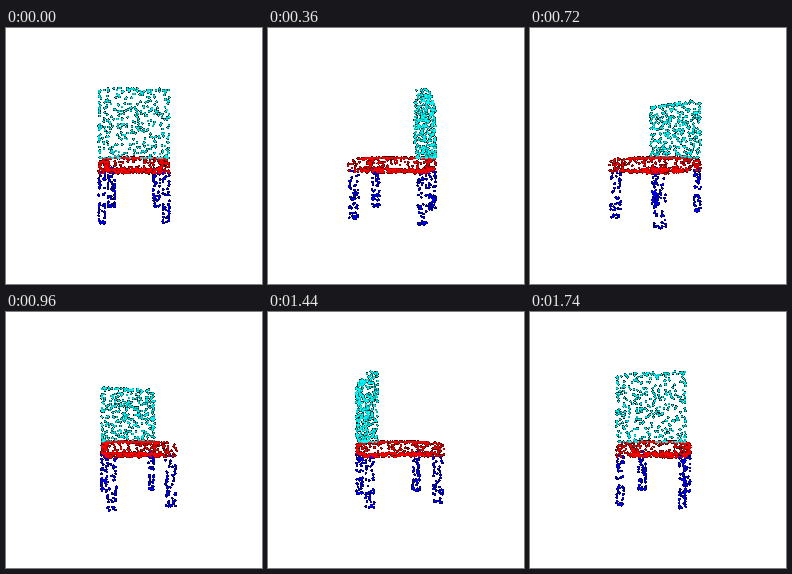
Animation of 256x256 px, one loop 1.8 s. Source, as a matplotlib script:

```python
import numpy as np
import matplotlib.pyplot as plt
from matplotlib.animation import FuncAnimation

SIZE, FRAMES, LOOP_MS = 256, 30, 1800
FOCAL = SIZE / 2 / np.tan(np.radians(30))
DIST = 2.7
RADIUS = 1.4  # dot radius in pixels
CYAN, RED, BLUE = (0, 1, 1), (1, 0, 0), (0, 0, 1)

rng = np.random.default_rng(7)


def box(n, lo, hi):
    """Random points spread evenly over the surface of a box."""
    lo, hi = np.array(lo, float), np.array(hi, float)
    size = hi - lo
    areas = size.prod() / size
    axis = rng.choice(3, n, p=areas / areas.sum())
    unit = rng.random((n, 3))
    unit[np.arange(n), axis] = rng.integers(0, 2, n)
    return lo + unit * size


def make_seat(n):
    """Slab with softly rounded top edges."""
    pts = box(n, (-0.365, -0.178, -0.45), (0.365, -0.022, 0.43))
    x, y, z = pts.T
    rim = np.maximum(abs(x) / 0.365, abs(z) / 0.45) ** 8
    pts[:, 1] = -0.178 + (y + 0.178) * (1 - 0.2 * rim)
    return pts


def make_leg(n, side, x, z, bottom):
    pts = box(n, (x[0], bottom, z[0]), (x[1], -0.17, z[1]))
    pts[:, 0] *= side
    return pts


parts = [
    (box(390, (-0.362, -0.02, 0.31), (0.362, 0.695, 0.435)), CYAN),
    (make_seat(460), RED),
]
for side in (-1, 1):
    parts.append((make_leg(54, side, (0.305, 0.365), (0.35, 0.43), -0.695), BLUE))
    parts.append((make_leg(54, side, (0.27, 0.36), (-0.44, -0.36), -0.705), BLUE))

points = np.vstack([p for p, _ in parts])
colors = np.vstack([np.tile(c, (len(p), 1)) for p, c in parts])


def project(angle):
    x, y, z = points.T
    c, s = np.cos(angle), np.sin(angle)
    depth = DIST - (z * c - x * s)
    scale = FOCAL / depth
    mid = SIZE / 2
    return mid + (x * c + z * s) * scale, mid - y * scale, depth


def render(angle):
    """Blend soft dots from far to near over black; untouched pixels stay white."""
    px, py, depth = project(angle)
    img = np.zeros((SIZE, SIZE, 3))
    hit = np.zeros((SIZE, SIZE), bool)
    reach = np.arange(-2, 3)
    for i in np.argsort(-depth):
        cols = int(px[i]) + reach
        rows = int(py[i]) + reach
        dx = cols + 0.5 - px[i]
        dy = rows + 0.5 - py[i]
        w = np.clip(1 - (dx**2 + dy[:, None] ** 2) / RADIUS**2, 0, 1)
        area = np.s_[rows[0]:rows[-1] + 1, cols[0]:cols[-1] + 1]
        a = w[..., None]
        img[area] = img[area] * (1 - a) + colors[i] * a
        hit[area] |= w > 0
    img[~hit] = 1
    return img


fig = plt.figure(figsize=(SIZE / 100, SIZE / 100), dpi=100, facecolor="white")
ax = fig.add_axes([0, 0, 1, 1])
ax.axis("off")
picture = ax.imshow(np.ones((SIZE, SIZE, 3)), interpolation="nearest", aspect="auto")


def update(frame):
    picture.set_data(render(2 * np.pi * frame / FRAMES))
    return (picture,)


anim = FuncAnimation(fig, update, frames=FRAMES, interval=LOOP_MS / FRAMES,
                     repeat=True, repeat_delay=0, blit=False)
plt.show()
```
